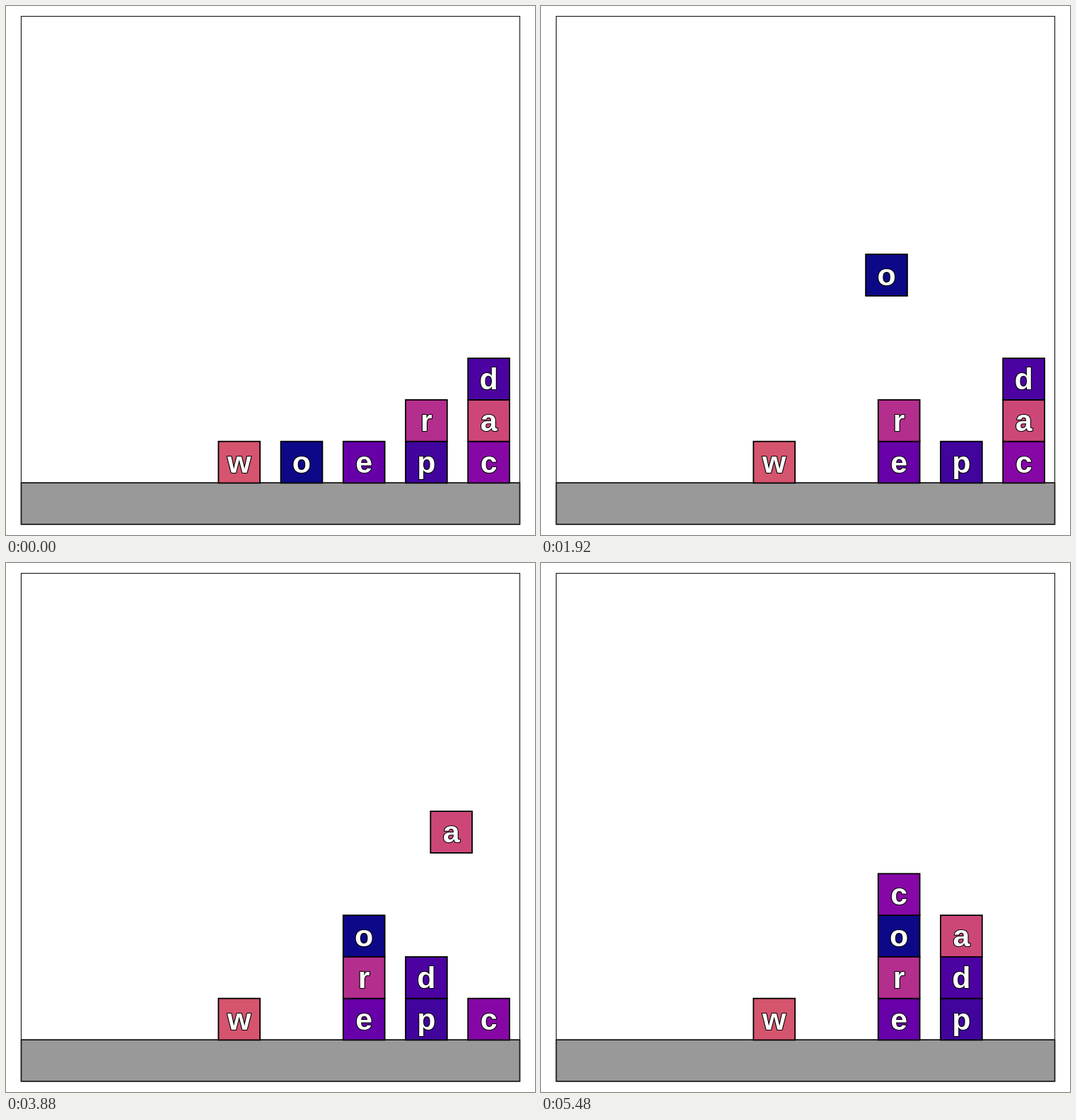
An HTML page that plays this animation: 748x748 px, repeating every 5.52 s.

```html
<!DOCTYPE html>
<html lang="en">
<head>
<meta charset="utf-8">
<title>Stacking blocks</title>
<style>
  html, body { margin: 0; width: 100%; height: 100%; overflow: hidden; background: #fff; }
  svg { display: block; width: 100vw; height: 100vh; }
  rect { stroke: #000; stroke-width: 1.8; }
  text {
    font: bold 43px "Liberation Sans", Arial, sans-serif;
    text-anchor: middle; fill: #fff;
    stroke: #000; stroke-width: 2.2; stroke-linejoin: round; paint-order: stroke;
  }
  .axes { fill: none; stroke: #222; stroke-width: 1.2; }
</style>
</head>
<body>
<svg viewBox="0 0 748 748">
  <rect x="21.5" y="674.2" width="705" height="58.6" fill="#999" style="stroke-width:1.6"/>
  <g id="blocks"></g>
  <rect class="axes" x="21.5" y="14.6" width="705" height="718.2"/>
</svg>
<script>
const UNIT = 58.8, LEFT = 21.1, FLOOR = 674.5;
const STEP = 0.3, CARRY = 4.5, TICK = 40;

// letter: colour, column position and level, in block units
const blocks = {
  w: ['#d5546e', 4.75, 0],
  o: ['#0d0887', 6.25, 0],
  e: ['#6700a8', 7.75, 0],
  p: ['#41049d', 9.25, 0],
  r: ['#b42e8d', 9.25, 1],
  c: ['#8707a6', 10.75, 0],
  a: ['#cc4778', 10.75, 1],
  d: ['#4c02a1', 10.75, 2],
};
// letter, destination column, destination level
const moves = [['r', 7.75, 1], ['o', 7.75, 2], ['d', 9.25, 1], ['a', 9.25, 2], ['c', 7.75, 3]];

const make = (name, attrs, parent) => {
  const node = document.createElementNS('http://www.w3.org/2000/svg', name);
  for (const key in attrs) node.setAttribute(key, attrs[key]);
  return parent.appendChild(node);
};

const nodes = {};
for (const [letter, [fill]] of Object.entries(blocks)) {
  const g = nodes[letter] = make('g', {}, document.getElementById('blocks'));
  make('rect', { width: UNIT, height: UNIT, y: -UNIT, fill }, g);
  make('text', { x: UNIT / 2, y: -UNIT / 2 + 14.5 }, g).textContent = letter;
}

// Each move is lift, carry, lower, split into equal steps near STEP long.
const legs = [];
let total = 0;
for (const [letter, x1, y1] of moves) {
  const [, x0, y0] = blocks[letter];
  const path = [[x0, y0], [x0, CARRY], [x1, CARRY], [x1, y1]];
  for (let i = 0; i < 3; i++) {
    const [from, to] = [path[i], path[i + 1]];
    const length = Math.abs(to[0] - from[0]) + Math.abs(to[1] - from[1]);
    const steps = Math.round(length / STEP);
    legs.push({ letter, from, to, start: total, steps });
    total += steps;
  }
}

function draw(now) {
  const tick = Math.floor((now + 0.01) / TICK) % (total + 1);
  const pos = {};
  for (const letter in blocks) pos[letter] = blocks[letter].slice(1);
  for (const { letter, from, to, start, steps } of legs) {
    if (tick < start) break;
    const k = Math.min(1, (tick - start) / steps);
    pos[letter] = from.map((v, i) => v + (to[i] - v) * k);
  }
  for (const letter in pos) {
    const [x, y] = pos[letter];
    nodes[letter].setAttribute('transform', `translate(${LEFT + x * UNIT} ${FLOOR - y * UNIT})`);
  }
}

const begin = performance.now();
(function loop() {
  draw(performance.now() - begin);
  requestAnimationFrame(loop);
})();
</script>
</body>
</html>
```
